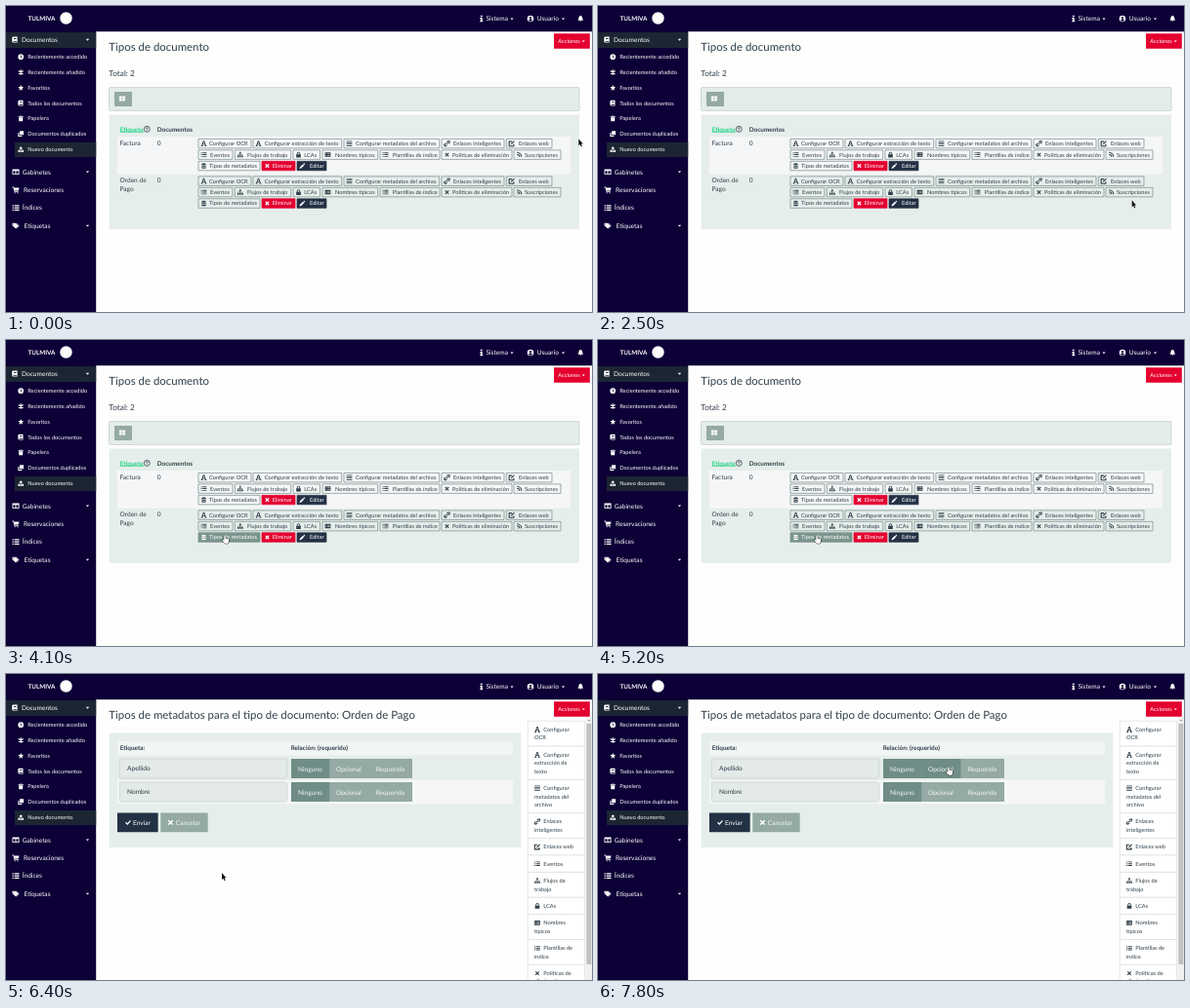
Write an HTML page with a canvas that moves like this. It is 600 px wide and 314 px high and loops after 8 s.

```html
<!DOCTYPE html>
<html lang="es">
<head>
<meta charset="utf-8">
<title>Tipos de documento</title>
<style>
  html, body { margin: 0; width: 100%; height: 100%; overflow: hidden; background: #fefefd; }
  canvas { display: block; width: 600px; height: 314px; }
</style>
</head>
<body>
<canvas id="stage"></canvas>
<script>
const canvas = document.getElementById('stage');
const ctx = canvas.getContext('2d');
const dpr = window.devicePixelRatio || 1;
canvas.width = 600 * dpr;
canvas.height = 314 * dpr;
ctx.textRendering = 'geometricPrecision';

const LOOP = 8000, STEP = 100, PAGE_CHANGE = 6400, CLICK = 5800;
const NAVY = '#0c0036', ACTIVE = '#1c2632', DARK = '#233145', RED = '#e4002f';
const PANEL = '#e6eeeb', STRIPE = '#f5f6f7', SAGE = '#95aaa4', SAGE_DARK = '#6f8d86';
const INK = '#2f3f4a', WHITE = '#fff';

// Icons live in a 10 x 10 box; the second group is stroked.
const disc = 'M0 5a5 5 0 1 0 10 0a5 5 0 1 0-10 0Z';
const filled = {
  book: 'M2 0H9V10H2Q0 10 0 8V2Q0 0 2 0ZM3 2.5V4H7V2.5ZM2 8V9H8V8Z',
  clock: disc + 'M4.3 2H5.6V5L7.6 6.4L7 7.4L4.3 5.6Z',
  star: 'M5 0L6.5 3.4L10 3.8L7.4 6.2L8.1 10L5 8.1L1.9 10L2.6 6.2L0 3.8L3.5 3.4Z',
  trash: 'M.5 1H3.5L4 0H6L6.5 1H9.5V2.3H.5ZM1.2 3H8.8L8.3 10H1.7Z',
  clone: 'M3 0H10V7H3ZM0 3H2V8H7V10H0Z',
  upload: 'M5 0L8.5 3.7H6.2V6.5H3.8V3.7H1.5ZM0 6.5H3V7.5H7V6.5H10V10H0Z',
  columns: 'M0 1H10V9H0ZM1.3 3.5V7.7H4.3V3.5ZM5.7 3.5V7.7H8.7V3.5Z',
  cart: 'M0 .5H2L2.5 2H10L8.8 6H3.5L3.7 7H9V8H2.8L1.4 1.7H0ZM3 8.5h1.5V10H3ZM7 8.5h1.5V10H7Z',
  list: [1, 4.2, 7.4].map(y => `M0 ${y}h1.8v1.6H0ZM3 ${y}H10v1.6H3Z`).join(''),
  rows: [.4, 3, 5.6, 8.2].map(y => `M0 ${y}H10v1.4H0Z`).join(''),
  tags: 'M0 1H4.5L8.5 5L4.5 9L0 4.5ZM1.5 2.5h1.2v1.2H1.5ZM6 1L10 5L6 9.2L5.3 8.5L8.9 5L5 1Z',
  info: 'M3.5 0h3v2.3h-3ZM2.8 3.5H6.4V8.5H7.3V10H2.7V8.5H3.6V5H2.8Z',
  user: disc + 'M3.2 3.8a1.8 1.8 0 1 0 3.6 0a1.8 1.8 0 1 0-3.6 0ZM2 8Q2.4 6 5 6Q7.6 6 8 8Q5 10 2 8Z',
  bell: 'M5 0Q8 1 8 4Q8 6.5 9.5 7.7H.5Q2 6.5 2 4Q2 1 5 0ZM3.7 8.5H6.3Q5 11 3.7 8.5Z',
  sitemap: 'M3.7 0H6.3V3H5.5V4.3H9V6.5H10V9.5H7.3V6.5H8.2V5.2H5.5V6.5H6.3V9.5H3.7V6.5H4.5V5.2H1.8V6.5H2.7V9.5H0V6.5H1V4.3H4.5V3H3.7Z',
  lock: 'M1 4.5H2V3A3 3 0 0 1 8 3V4.5H9V10H1ZM3.5 4.5H6.5V3A1.5 1.5 0 0 0 3.5 3Z',
  keyboard: 'M0 1H10V9H0ZM1.2 3h1.5v1H1.2ZM4 3H8.8V4H4ZM1.2 5.8h1.5v1H1.2ZM4 5.8H8.8v1H4Z',
  grid: 'M0 1H4.6V4.6H0ZM5.4 1H10V4.6H5.4ZM0 5.4H4.6V9H0ZM5.4 5.4H10V9H5.4Z',
  database: 'M1 1.5Q5-1 9 1.5V3Q5 4.5 1 3ZM1 4Q5 5.5 9 4V6Q5 7.5 1 6ZM1 7Q5 8.5 9 7V8.8Q5 11 1 8.8Z',
  pencil: 'M0 10L.6 7.2L6 1.8L8.2 4L2.8 9.4ZM6.7 1.1L7.8 0L10 2.2L8.9 3.3Z',
  font: 'M0 10V8.7H.8L4 0H6L9.2 8.7H10V10H6.5V8.7H7.3L6.8 7H3.2L2.7 8.7H3.5V10ZM3.7 5.6H6.3L5 2Z',
  caret: 'M1 3H9L5 7.5Z'
};
const stroked = {
  cross: 'M2 2L8 8M8 2L2 8',
  check: 'M1 5L4 8L9 2',
  asterisk: 'M5 0V10M.7 2.5L9.3 7.5M9.3 2.5L.7 7.5',
  link: 'M4 6L6 4M5 2.5L6.5 1Q8 0 9.2 1T9 3.5L7.5 5M5 7.5L3.5 9Q2 10 .8 9T1 6.5L2.5 5',
  rss: 'M1 1A8 8 0 0 1 9 9M1 4.5A4.5 4.5 0 0 1 5.5 9M1.2 8.8h.8',
  edit: 'M5.5 1.5H.5V9.5H8.5V6M4 6.5L9.5 .8',
  help: disc + 'M3.5 4Q3.6 2.4 5 2.4Q6.5 2.4 6.5 3.8Q6.5 4.6 5 5.8M5 7V8'
};
const arrow = new Path2D('M0 0V7L1.5 5.7L2.5 8.2L3.6 7.7L2.6 5.3H4.5Z');
const hand = new Path2D('M-.7 .6Q0-.4 .7 .6V3.4L3.6 4Q4.4 4.3 4.2 6L3.5 8.8H0L-2.3 5.9Q-2.4 4.7-1.4 5.1L-.7 5.8Z');

const pathCache = {};
function icon(name, x, y, color, size = 5.6) {
  const path = pathCache[name] ||= new Path2D(filled[name] || stroked[name]);
  ctx.save();
  ctx.translate(x - size / 2, y - size / 2);
  ctx.scale(size / 10, size / 10);
  ctx.fillStyle = ctx.strokeStyle = color;
  ctx.lineWidth = name === 'help' ? 1.3 : 2;
  if (filled[name]) ctx.fill(path, 'evenodd'); else ctx.stroke(path);
  ctx.restore();
}
function text(label, x, y, size = 6.59, color = INK, weight = 400) {
  ctx.font = `${weight} ${size}px Lato, sans-serif`;
  ctx.fillStyle = color;
  ctx.fillText(label, x, y + size * .35);
}
function box(left, top, right, bottom, fill, border, radius = 0) {
  ctx.beginPath();
  ctx.roundRect(left, top, right - left, bottom - top, radius);
  if (fill) { ctx.fillStyle = fill; ctx.fill(); }
  if (border) { ctx.strokeStyle = border; ctx.lineWidth = .7; ctx.stroke(); }
}

// Pointer path: [time, x, y]
const track = [
  [0, 586.3, 136.2], [1900, 586.3, 136.2], [2000, 583.2, 137.5], [2700, 532, 224], [2900, 532, 224],
  [3100, 315, 248], [3300, 282, 243], [3500, 282, 243], [4100, 224, 200], [5700, 224, 200],
  [5800, 221, 204], [6400, 221, 204], [7200, 359, 95], [LOOP, 359, 95]
];
const pointer = { x: 0, y: 0, over: false };
function movePointer(t) {
  const i = track.findIndex(key => key[0] > t);
  const [t0, x0, y0] = track[i - 1], [t1, x1, y1] = track[i];
  const k = (t - t0) / (t1 - t0);
  pointer.x = x0 + (x1 - x0) * k;
  pointer.y = y0 + (y1 - y0) * k;
  pointer.over = false;
}
function hovered(left, top, right, bottom) {
  const hit = pointer.x > left && pointer.x < right && pointer.y > top && pointer.y < bottom;
  pointer.over ||= hit;
  return hit;
}
function drawPointer(t) {
  const loading = t >= CLICK && t < PAGE_CHANGE;
  const isHand = pointer.over && !loading;
  const shape = isHand ? hand : arrow;
  ctx.save();
  ctx.translate(pointer.x, pointer.y);
  ctx.lineJoin = 'round';
  ctx.lineWidth = isHand ? .9 : .8;
  ctx.strokeStyle = isHand ? '#111' : WHITE;
  ctx.fillStyle = isHand ? WHITE : '#111';
  ctx.stroke(shape);
  ctx.fill(shape);
  ctx.restore();
}

const submenu = [
  ['clock', 'Recientemente accedido'], ['asterisk', 'Recientemente añadido'], ['star', 'Favoritos'],
  ['book', 'Todos los documentos'], ['trash', 'Papelera'], ['clone', 'Documentos duplicados'],
  ['upload', 'Nuevo documento']
];
const menu = [
  ['columns', 'Gabinetes', 16.7, true], ['cart', 'Reservaciones', 18],
  ['list', 'Índices', 16.7], ['tags', 'Etiquetas', 18.5, true]
];
function drawFrame() {
  box(0, 0, 600, 314, '#fefefd');
  box(0, 0, 600, 26.35, NAVY);
  box(0, 26, 92.2, 314, NAVY);
  text('TULMIVA', 22.5, 13, 6.3, WHITE, 700);
  ctx.beginPath();
  ctx.arc(61.5, 12.5, 6.2, 0, 7);
  ctx.fillStyle = WHITE;
  ctx.fill();

  icon('info', 486.8, 13, WHITE, 6.6);
  text('Sistema', 491.5, 13, 6.59, WHITE);
  icon('caret', 518, 13.3, WHITE, 4.2);
  icon('user', 537, 13, WHITE, 6.6);
  text('Usuario', 543.8, 13, 6.59, WHITE);
  icon('caret', 570.5, 13.3, WHITE, 4.2);
  icon('bell', 588.3, 13, WHITE, 6.4);

  box(0, 27, 92.2, 43, ACTIVE);
  icon('book', 9.2, 34.5, WHITE, 6);
  text('Documentos', 16, 34.5, 6.59, WHITE);
  icon('caret', 83.5, 34.7, WHITE, 4.2);
  box(9, 140, 92.2, 155, ACTIVE);
  submenu.forEach(([name, label], i) => {
    const y = 52.2 + i * 15.8;
    icon(name, 15.2, y, WHITE, 5.7);
    text(label, 22.2, y, 5.7, WHITE);
  });
  menu.forEach(([name, label, x, open], i) => {
    const y = 170.3 + i * 18.4;
    icon(name, 10, y, WHITE, 7);
    text(label, x, y, 6.59, WHITE);
    if (open) icon('caret', 83.5, y, WHITE, 4.2);
  });
}
function drawActions() {
  box(561, 28.3, 597.8, 43.7, RED);
  text('Acciones', 565.3, 36, 5.7, WHITE);
  icon('caret', 591.3, 36.3, WHITE, 3.6);
}
function drawRule(y, right) {
  box(105.5, y, right, y + .45, '#e8edee');
}

// Button rows: icon, label, left, right, text x, fill
const buttonRows = [
  [['font', 'Configurar OCR', 197, 251, 208], ['font', 'Configurar extracción de texto', 253, 343.7, 264.7],
   ['rows', 'Configurar metadatos del archivo', 346, 443.7, 358], ['link', 'Enlaces inteligentes', 446, 510, 458],
   ['edit', 'Enlaces web', 512.3, 559, 525]],
  [['list', 'Eventos', 197, 232, 209], ['sitemap', 'Flujos de trabajo', 234.3, 291.7, 247],
   ['lock', 'LCAs', 294, 321.5, 305.3], ['keyboard', 'Nombres típicos', 324, 380.7, 337],
   ['list', 'Plantillas de índice', 383, 444, 395.8], ['cross', 'Políticas de eliminación', 446, 518, 457],
   ['rss', 'Suscripciones', 520, 568, 531]],
  [['database', 'Tipos de metadatos', 197, 260, 208], ['cross', 'Eliminar', 262, 296, 272.7, RED],
   ['pencil', 'Editar', 298, 328, 311, DARK]]
];
function drawButtons(top) {
  buttonRows.forEach((row, r) => {
    const y = top + r * 11.45, bottom = y + 9.5;
    for (const [name, label, left, right, textX, fill] of row) {
      const hot = hovered(left, y, right, bottom);
      const color = fill || hot ? WHITE : INK;
      box(left, y, right, bottom, fill || (hot ? '#7b958f' : null), fill || '#748a87');
      icon(name, left + 5.5, y + 4.7, color, 5.8);
      text(label, textX, y + 4.7, 5.7, color);
    }
  });
}
function drawTypeList() {
  text('Tipos de documento', 105.3, 41.8, 11.45);
  drawRule(54.9, 587);
  text('Total: 2', 105.3, 68.7, 8.3);
  drawRule(78.8, 587);
  box(105.5, 83.5, 587, 107.5, '#e4ecea', '#c3cfca', 1);
  box(111, 88, 129, 103, SAGE);
  icon('grid', 119, 95, WHITE, 6.2);

  box(105.5, 111.5, 587, 229, PANEL);
  text('Etiqueta', 116.7, 126.3, 6.4, '#1fd387', 700);
  box(116.7, 129.2, 141, 129.8, '#1fd387');
  icon('help', 144.3, 126.3, INK, 6);
  text('Documentos', 154.8, 126.3, 6.4, INK, 700);
  box(114, 134, 578, 172.7, STRIPE);
  text('Factura', 116.5, 140.5);
  text('0', 154.7, 140.5);
  text('Orden de', 116.5, 179);
  text('Pago', 116.5, 188);
  text('0', 154.7, 179);
  drawButtons(136.4);
  drawButtons(174.9);
  drawActions();
}

const sideLinks = [
  ['font', 'Configurar', 'OCR'], ['font', 'Configurar', 'extracción de', 'texto'],
  ['rows', 'Configurar', 'metadatos del', 'archivo'], ['link', 'Enlaces', 'inteligentes'],
  ['edit', 'Enlaces web'], ['list', 'Eventos'], ['sitemap', 'Flujos de', 'trabajo'], ['lock', 'LCAs'],
  ['keyboard', 'Nombres', 'típicos'], ['list', 'Plantillas de', 'índice'], ['cross', 'Políticas de', 'eliminación']
];
const choices = [['Ninguno', 292, 331.2, 299], ['Opcional', 331.2, 371.5, 338], ['Requerido', 371.5, 416, 378.7]];
function drawField(label, top) {
  const y = top + 10;
  box(116.3, top, 287.7, top + 20, '#e3eae8', '#c8d2ce', 1.5);
  text(label, 124, y);
  box(292, top, 416, top + 20, SAGE);
  choices.forEach(([choice, left, right, x], i) => {
    const hot = hovered(left, top, right, top + 20);
    if (i === 0 || hot) box(left, top, right, top + 20, SAGE_DARK);
    text(choice, x, y + .3, 6.59, '#f4f7f6');
  });
}
function drawSideLinks() {
  let top = 48.3;
  for (const [name, ...lines] of sideLinks) {
    const height = 8.95 + 8.45 * lines.length;
    box(534.3, top, 592.5, top + height, WHITE, '#dcdfde');
    icon(name, 544, top + 8.7, INK, 5.8);
    lines.forEach((line, i) => text(line, i ? 541 : 550.3, top + 8.7 + i * 8.45, 5.7));
    top += height;
  }
  box(593.5, 44, 600, 314, '#f1f1f1');
  box(594.3, 51, 599.3, 298, '#c1c1c1');
  box(596, 47.2, 598, 48.2, '#777');
}
function drawMetadataForm() {
  text('Tipos de metadatos para el tipo de documento: Orden de Pago', 105.3, 41.8, 11.45);
  drawRule(54.9, 527.5);
  box(105.5, 60.5, 527.5, 178, PANEL);
  box(114, 69, 519, 83.5, '#f1f5f3');
  text('Etiqueta:', 116.7, 76, 6.4, INK, 700);
  text('Relación: (requerido)', 291.7, 76, 6.4, INK, 700);
  box(114, 109, 519, 133.3, STRIPE);
  drawField('Apellido', 87);
  drawField('Nombre', 111);
  box(114, 142.5, 155.7, 162.3, DARK);
  icon('check', 125, 152.3, WHITE, 6.2);
  text('Enviar', 130, 152.3, 6.59, WHITE);
  box(158.3, 142.5, 206.7, 162.3, SAGE);
  icon('cross', 168.5, 152.3, WHITE, 7.2);
  text('Cancelar', 173.8, 152.3, 6.59, '#f4f7f6');
  drawSideLinks();
  drawActions();
}

const start = performance.now();
function render(now) {
  const elapsed = Math.max(0, now - start) % LOOP;
  const t = Math.floor(elapsed / STEP) * STEP;
  ctx.setTransform(dpr, 0, 0, dpr, 0, 0);
  movePointer(t);
  drawFrame();
  if (t < PAGE_CHANGE) drawTypeList(); else drawMetadataForm();
  drawPointer(t);
  requestAnimationFrame(render);
}
render(start);
</script>
</body>
</html>
```
